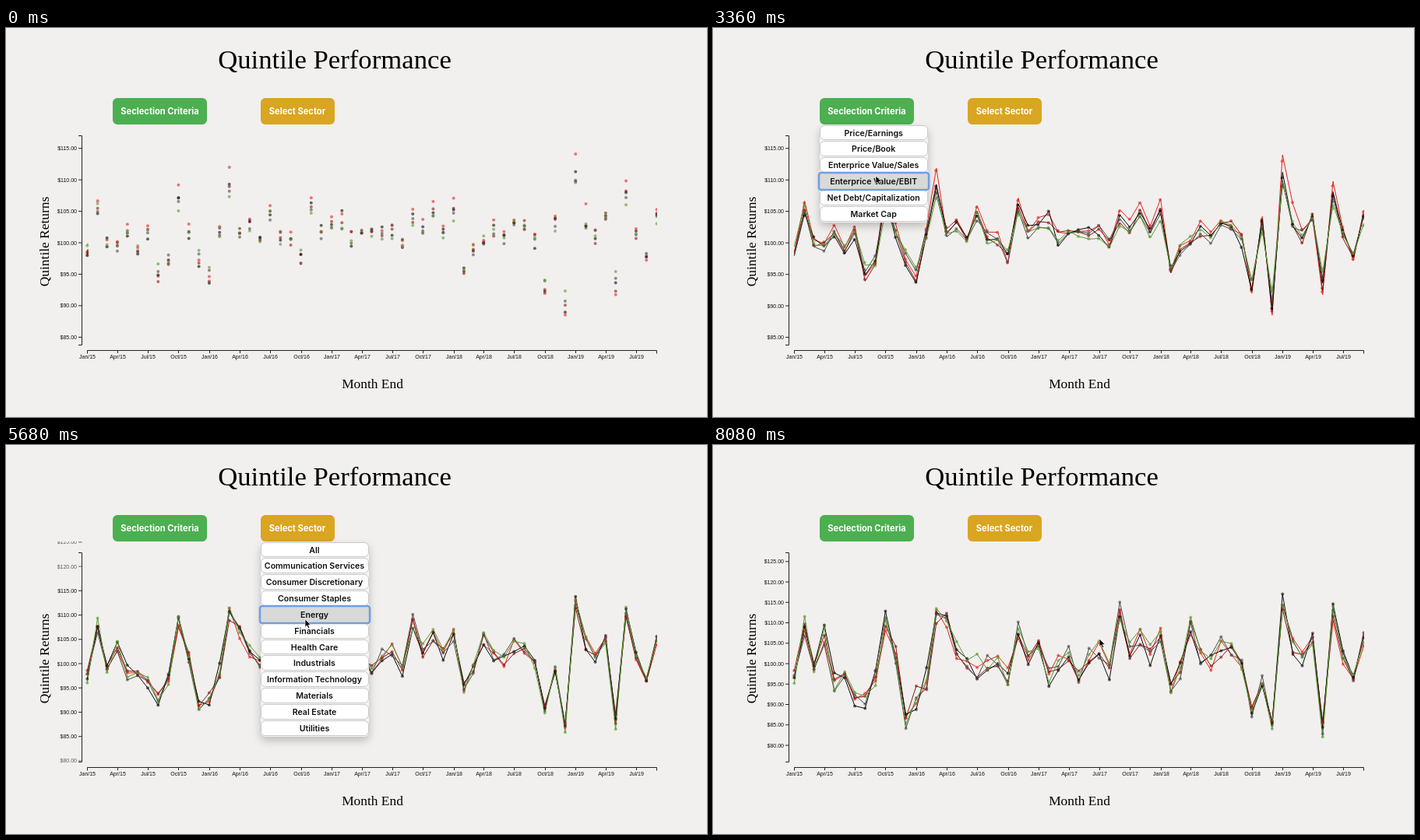
An HTML page for the animation above (8160 ms loop, 900x500 px).

```html
<!DOCTYPE html>
<html lang="en">
<head>
<meta charset="utf-8">
<title>Quintile Performance</title>
<style>
  html, body { margin: 0; width: 900px; height: 500px; overflow: hidden; background: #f1f0ee; }
  svg { position: absolute; left: 0; top: 0; }
  .serif { font-family: "Liberation Serif", Times, serif; text-anchor: middle; }
  .axis text { font: 7px "Liberation Sans", Arial, sans-serif; fill: #111; }
  .axis path { fill: none; stroke: #222; }
  .btn { position: absolute; top: 90px; height: 34px; border-radius: 6px; color: #fff;
    font: 700 11.1px/34px Inter, sans-serif; text-align: center; white-space: nowrap; }
  .menu { position: absolute; top: 124.5px; width: 139px; border-radius: 6px; background: #f4f4f3;
    box-shadow: 0 5px 11px rgba(0,0,0,.22); }
  .item { height: 19.85px; margin-bottom: 1px; border-radius: 6px; border: solid #c9c9c9;
    border-width: .5px .5px 1px; box-sizing: border-box; background: #fff; color: #111;
    font: 600 10.6px/19.4px Inter, sans-serif; text-align: center; white-space: nowrap; }
  .item.hover { background: #d8d9d9; }
  .item.focus { box-shadow: 0 0 0 2.3px #6c9fe8; border-radius: 2px; position: relative; }
</style>
</head>
<body>
<svg width="900" height="500">
  <defs><clipPath id="plot"><rect x="50" y="124" width="786" height="330"/></clipPath></defs>
  <text class="serif" x="422" y="52" font-size="34.7">Quintile Performance</text>
  <text class="serif" x="470.5" y="463" font-size="17.4">Month End</text>
  <text class="serif" transform="translate(55 274.5) rotate(-90)" font-size="17.4">Quintile Returns</text>
  <g class="axis" id="xAxis"><path d="M104.5 418.5V414.5H835.5V418.5"/></g>
  <g class="axis" id="yAxis" clip-path="url(#plot)"><path d="M93 138.5H97.5V407.5H93"/></g>
  <g id="marks" clip-path="url(#plot)"></g>
</svg>
<div class="btn" style="left:137px;width:121px;background:#4caf50">Seclection Criteria</div>
<div class="btn" style="left:326.5px;width:95px;background:#daa520">Select Sector</div>
<svg width="900" height="500" style="z-index:5;pointer-events:none">
  <path id="cursor" d="M0 0V10L2.3 8L4 11.6L5.7 10.8L4.1 7.3H7.2Z" fill="#000" stroke="#fff" stroke-width=".7"/>
</svg>
<script>
const LOOP = 8160, STEP = 80;
const DRAW = { start: -147, length: 2000 };
const MORPH_1 = 3140, MORPH_2 = 5120, MORPH_LENGTH = 1000;

const $ = id => document.getElementById(id);
const lerp = (a, b, p) => a + (b - a) * p;
const clamp = v => Math.max(0, Math.min(1, v));
const ease = u => u < .5 ? 4 * u ** 3 : 1 - 4 * (1 - u) ** 3;
const progress = (t, start, length) => ease(clamp((t - start) / length));

let seed = 7;
const random = () => (seed = seed * 16807 % 2147483647) / 2147483647;

// Monthly return of the whole market in dollars; every quintile follows it.
const MARKET = [
  98.3, 105.7, 99.6, 99.4, 101.6, 98.5, 101.7, 95, 97.2, 107, 101.1, 97.7,
  94.3, 101.4, 108.5, 101.1, 102.2, 100.5, 104.8, 100.4, 100.2, 97.7, 105.4, 101.5,
  103, 103.7, 100.3, 101.2, 101.5, 101.4, 102, 99.4, 103.5, 102, 104.8, 101.5,
  105, 95.8, 99.3, 100.2, 101.7, 101.1, 103.2, 102.3, 100.4, 93.1, 103, 89.9,
  110.3, 103.7, 101.2, 103.7, 93.8, 107.9, 101.1, 97.3, 103.8
];
const MONTHS = MARKET.length, MEAN = 100.7;

// Months in which the energy sector leaves the market.
const SHOCKS = { 3: 8, 4: -7, 6: -11, 11: -10, 13: -6, 15: 9, 18: -8, 25: -8, 28: -7, 32: 8, 39: 10, 46: -8, 52: -6 };

const COLORS = ['#e6231c', '#8a1712', '#080808', '#4a4a4a', '#569a2c'];

// zero: height of $100, unit: pixels per dollar, betas: swing of each quintile.
const STATES = [
  { zero: 276, unit: 8.09, betas: [1.2, 1.07, 1, .95, .88], noise: 1.5, lift: .7 },
  { zero: 281, unit: 8.17, betas: [1.1, 1, .95, .95, 1.15], noise: 1.5, lift: 0 },
  { zero: 281, unit: 5.25, betas: [1.4, 1.4, 1.5, 1.5, 1.7], noise: 3.4, lift: 0, shocks: SHOCKS }
];
const toY = (state, value) => state.zero + (100 - value) * state.unit;

function quintiles(state) {
  const { betas, noise, lift, shocks = {} } = state;
  return betas.map((beta, s) => MARKET.map((m, i) => {
    const jitter = (random() + random() - 1) * noise;
    const bias = s ? 0 : lift;
    return toY(state, MEAN + (m - MEAN) * beta + (shocks[i] || 0) + jitter + bias);
  }));
}
const [A, B, C] = STATES.map(quintiles);

function svg(parent, tag, attrs, text) {
  const node = document.createElementNS('http://www.w3.org/2000/svg', tag);
  for (const key in attrs) node.setAttribute(key, attrs[key]);
  if (text) node.textContent = text;
  parent.append(node);
  return node;
}

const day = i => Date.UTC(2015, i, 1);
const monthX = i => 104.3 + 731.2 * (day(i) - day(0)) / (day(MONTHS - 1) - day(0));

for (let i = 0; i < MONTHS; i += 3) {
  const x = Math.round(monthX(i)) + .5;
  const name = ['Jan', 'Apr', 'Jul', 'Oct'][i / 3 % 4] + '/' + (15 + Math.floor(i / 12));
  svg($('xAxis'), 'path', { d: `M${x} 414.5V418` });
  svg($('xAxis'), 'text', { x, y: 425.2, 'text-anchor': 'middle' }, name);
}

const ticks = [];
for (let value = 80; value <= 125; value += 5) {
  const node = svg($('yAxis'), 'g', {});
  svg(node, 'path', { d: 'M93 0H97.5' });
  svg(node, 'text', { x: 91, y: 2.5, 'text-anchor': 'end' }, `$${value}.00`);
  ticks.push({ value, node, late: value < 85 || value > 115 });
}

const lines = COLORS.map(stroke =>
  svg($('marks'), 'path', { fill: 'none', stroke, 'stroke-width': 1, pathLength: 1 }));
const dots = COLORS.map(fill => Array.from({ length: MONTHS }, () =>
  svg($('marks'), 'circle', { r: 2, fill, opacity: .6 })));

function makeMenu(left, names) {
  const box = document.createElement('div');
  box.className = 'menu';
  box.style.left = left + 'px';
  const items = names.map(name => {
    const item = document.createElement('div');
    item.className = 'item';
    item.textContent = name;
    box.append(item);
    return item;
  });
  document.body.append(box);
  return { box, items };
}

const menus = [
  { ...makeMenu(136.7, ['Price/Earnings', 'Price/Book', 'Enterprice Value/Sales', 'Enterprice Value/EBIT',
    'Net Debt/Capitalization', 'Market Cap']), open: 2240, close: 4000, hover: 2520, click: 3120, pick: 3 },
  { ...makeMenu(326.5, ['All', 'Communication Services', 'Consumer Discretionary', 'Consumer Staples', 'Energy',
    'Financials', 'Health Care', 'Industrials', 'Information Technology', 'Materials', 'Real Estate',
    'Utilities']), open: 4320, close: 6600, hover: 4400, click: 5100, pick: 4 }
];

// Pointer path: time, x, y.
const PATH = [
  [1840, 50, 8], [2320, 190, 108], [2480, 192, 132], [3000, 209, 190], [3760, 209, 190],
  [4320, 374, 106], [4800, 384, 224], [6320, 384, 224], [6800, 522, 182],
  [7200, 522, 182], [7920, 496, 249], [LOOP, 496, 249]
];

function pointer(t) {
  const n = PATH.findIndex(k => k[0] > t);
  if (n < 1) return null;
  const [a, b] = [PATH[n - 1], PATH[n]];
  const p = (t - a[0]) / (b[0] - a[0]);
  const s = p * p * (3 - 2 * p);
  return [lerp(a[1], b[1], s), lerp(a[2], b[2], s)];
}

function drawChart(t) {
  const p1 = progress(t, MORPH_1, MORPH_LENGTH);
  const p2 = progress(t, MORPH_2, MORPH_LENGTH);
  const blend = (a, b, c) => lerp(lerp(a, b, p1), c, p2);
  const drawn = progress(t, DRAW.start, DRAW.length);

  for (const { value, node, late } of ticks) {
    const y = blend(...STATES.map(state => toY(state, value)));
    node.setAttribute('transform', `translate(0 ${y.toFixed(1)})`);
    node.setAttribute('opacity', late ? p2 : 1);
  }

  lines.forEach((line, s) => {
    const points = A[s].map((y, i) => `${monthX(i).toFixed(1)} ${blend(y, B[s][i], C[s][i]).toFixed(1)}`);
    line.setAttribute('d', 'M' + points.join('L'));
    line.setAttribute('stroke-dasharray', drawn < 1 ? `${drawn} 2` : 'none');
  });

  // On the first change each dot slides in from the following month.
  const shift = t >= MORPH_1 ? 1 : 0;
  dots.forEach((row, s) => row.forEach((dot, i) => {
    const from = Math.min(i + shift, MONTHS - 1);
    dot.setAttribute('cx', lerp(monthX(i + shift), monthX(i), p1));
    dot.setAttribute('cy', blend(A[s][from], B[s][i], C[s][i]));
  }));
}

function drawMenus(t, at) {
  for (const m of menus) {
    m.box.style.display = t >= m.open && t < m.close ? 'block' : 'none';
    const over = at && t >= m.hover ? Math.floor((at[1] - 125) / 20.85) : -1;
    m.items.forEach((item, i) => {
      item.classList.toggle('hover', i === over);
      item.classList.toggle('focus', i === m.pick && t >= m.click);
    });
  }
}

function render(t) {
  const at = pointer(t);
  drawChart(t);
  drawMenus(t, at);
  $('cursor').style.display = at ? 'block' : 'none';
  if (at) $('cursor').setAttribute('transform', `translate(${at[0]} ${at[1]})`);
}

const begin = performance.now();
function tick() {
  const t = (performance.now() - begin) % LOOP;
  render(Math.floor(t / STEP) * STEP);
  requestAnimationFrame(tick);
}
tick();
</script>
</body>
</html>
```
